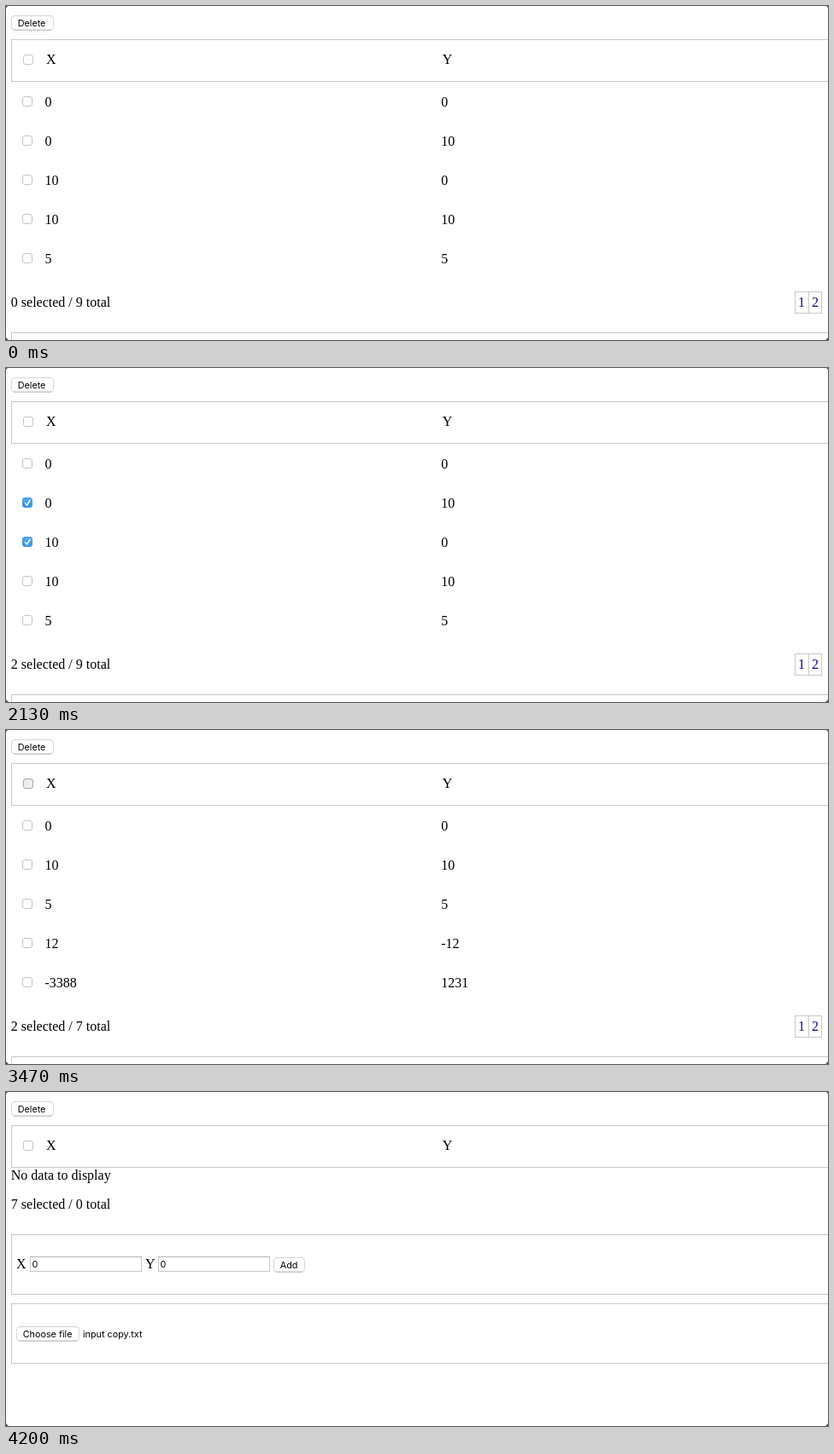
An HTML page for the animation above (5270 ms loop, 962x392 px).

```html
<!DOCTYPE html>
<html lang="en">
<head>
<meta charset="utf-8">
<title>Table</title>
<style>
html, body { margin: 0; width: 100%; height: 100%; overflow: hidden; background: #fff; }
svg { display: block; width: 100%; height: 100%; }
text { font: 16px "Liberation Serif", "Times New Roman", serif; fill: #000; white-space: pre; }
.ui { font: 10.8px Inter, sans-serif; }
.link { fill: #1a0a80; }
.line { fill: none; stroke: #c9c9c9; }
</style>
</head>
<body>
<svg id="stage" viewBox="0 0 962 392"></svg>
<script>
const LOOP = 5270;
const stage = document.getElementById('stage');

// Pointer presses and the releases that follow them
const T = {
  press2: 1200, check2: 1270,
  press3: 1800, check3: 1930,
  deleteDown: 2530, deleted: 2600,
  pressAll: 3470, checkAll: 3530,
  clearDown: 4130, cleared: 4200
};

const before = [[0, 0], [0, 10], [10, 0], [10, 10], [5, 5]];
const after = [[0, 0], [10, 10], [5, 5], [12, -12], [-3388, 1231]];

const defs = `<defs>
  <linearGradient id="down" x2="0" y2="1">
    <stop stop-color="#55a5f7"/><stop offset="1" stop-color="#1262de"/>
  </linearGradient>
  <linearGradient id="on" x2="0" y2="1">
    <stop stop-color="#58a9ee"/><stop offset="1" stop-color="#3d90e2"/>
  </linearGradient>
</defs>`;

const text = (x, y, s, cls = '') => `<text x="${x}" y="${y}" class="${cls}">${s}</text>`;
const frame = (x, y, w, h) => `<rect class="line" x="${x + .5}" y="${y + .5}" width="${w}" height="${h}"/>`;

function button(x, y, w, label, down) {
  const shade = down ? '' :
    `<path d="M${x + 3} ${y + 17.2}h${w - 6}" stroke="#bdbdbd"/>`;
  return `<rect x="${x + .5}" y="${y + .5}" width="${w - 1}" height="16.5" rx="3.5"
    fill="${down ? 'url(#down)' : '#fff'}" stroke="${down ? '#2a6fd0' : '#d6d6d6'}"/>` +
    shade + text(x + 7.7, y + 13, label, 'ui');
}

function checkbox(x, y, state) {
  const [fill, stroke] = {
    off: ['#fff', '#c6c6c6'],
    down: ['#efefef', '#a6a6a6'],
    on: ['url(#on)', '#4596e3']
  }[state];
  const tick = state === 'on'
    ? `<path d="M${x + 3.3} ${y + 6.4}l2.2 2.6l3.7 -5.8" fill="none" stroke="#fff" stroke-width="1.4" stroke-linecap="round"/>`
    : '';
  return `<rect x="${x + .5}" y="${y + .5}" width="11" height="11" rx="2.5" fill="${fill}" stroke="${stroke}"/>${tick}`;
}

function input(x, y, value) {
  return frame(x, y, 130, 17) +
    `<path d="M${x} ${y + .5}h131" stroke="#b4b4b4"/>` + text(x + 2.5, y + 13, value, 'ui');
}

function table(rows, states) {
  return rows.map(([a, b], i) => {
    const y = 106 + 46 * i;
    return checkbox(19, y, states[i]) + text(45.5, y + 11.5, a) + text(509.2, y + 11.5, b);
  }).join('');
}

function pager() {
  return frame(923, 335, 16, 25) + frame(939, 335, 15, 25) +
    text(927, 353.3, 1, 'link') + text(943, 353.3, 2, 'link');
}

function emptyView() {
  return text(5.8, 103.3, 'No data to display') +
    frame(6, 167, 970, 70) +
    text(12, 207.3, 'X') + input(28, 193, 0) +
    text(163, 207.3, 'Y') + input(178, 193, 0) +
    button(313, 194, 37, 'Add') +
    frame(6, 248, 970, 70) +
    button(12, 275, 74, 'Choose file') + text(90, 288, 'input copy.txt', 'ui');
}

const corners = '<path d="M0 0h2l-2 2zM962 0v2l-2-2zM0 392v-3l3 3zM962 392h-3l3-3z" fill="#555"/>';

function view(t) {
  const pick = (down, on) => t >= on ? 'on' : t >= down ? 'down' : 'off';
  const removed = t >= T.deleted, cleared = t >= T.cleared;
  const all = cleared ? 'off' : pick(T.pressAll, T.checkAll);
  const states = Array(5).fill(all === 'on' ? 'on' : 'off');
  if (!removed) {
    states[1] = pick(T.press2, T.check2);
    states[2] = pick(T.press3, T.check3);
  }
  const selected = t >= T.checkAll ? 7 : t >= T.check3 ? 2 : t >= T.check2 ? 1 : 0;
  const total = cleared ? 0 : removed ? 7 : 9;
  const down = t >= T.deleteDown && !removed || t >= T.clearDown && !cleared;

  const body = cleared
    ? emptyView()
    : table(removed ? after : before, states) + pager() + frame(6, 383, 970, 70);

  return defs + '<rect width="962" height="392" fill="#fff"/>' +
    button(6, 11, 50, 'Delete', down) +
    frame(6, 39, 970, 49) + checkbox(20, 57, all) +
    text(47, 68.3, 'X') + text(510.7, 68.3, 'Y') + body +
    text(5.8, cleared ? 137.3 : 353.3, `${selected} selected / ${total} total`) + corners;
}

let shown = '';
const start = performance.now();
function draw(now) {
  const next = view(Math.max(0, now - start) % LOOP);
  if (next !== shown) stage.innerHTML = shown = next;
  requestAnimationFrame(draw);
}
draw(start);
</script>
</body>
</html>
```
